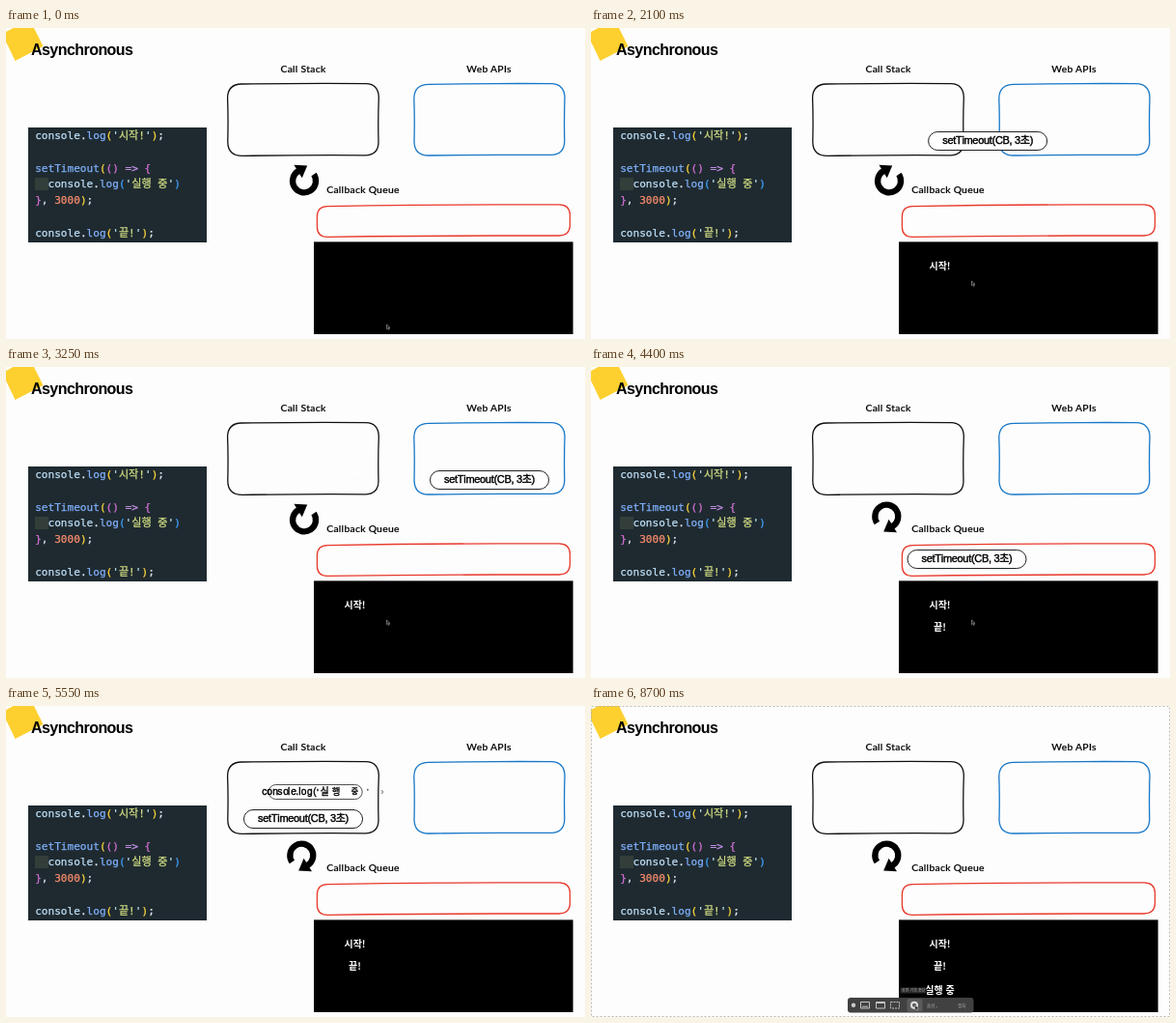
An HTML page that plays this animation: 600x322 px, repeating every 8.75 s.

```html
<!DOCTYPE html>
<html lang="ko">
<head>
<meta charset="utf-8">
<style>
html, body { margin: 0; width: 100%; height: 100%; overflow: hidden; background: #fdfdfd; }
#stage { position: relative; width: 600px; height: 322px; overflow: hidden; }
svg { position: absolute; inset: 0; }
text { font-family: 'Liberation Sans', 'Noto Sans CJK KR', 'Noto Sans CJK', sans-serif; }
.label { font: 500 10.3px Lato, sans-serif; letter-spacing: .3px; text-anchor: middle; stroke: #000; stroke-width: .2px; }
.out { font: 700 10px 'Noto Sans CJK KR', 'Noto Sans CJK', sans-serif; fill: #fff; text-anchor: middle; }
.tiny { font-size: 4.5px; fill: #aaa; }
#code {
  position: absolute; left: 23.2px; top: 102.6px; width: 177.6px; height: 118px; margin: 0;
  padding: 1.4px 0 0 7px; background: #1f2a30; color: #dfe8f2; -webkit-text-stroke: .25px;
  font: 11.08px/16.8px 'DejaVu Sans Mono', 'Noto Sans CJK KR', 'Noto Sans CJK', monospace;
}
#code i { font-style: normal; }
.o { color: #bfe0f8; } .f { color: #7fb0fb; } .y { color: #ffd83d; } .m { color: #d670d6; }
.b { color: #3fa2ff; } .k { color: #c792ea; } .n { color: #f78c6c; } .q { color: #b5e2f2; } .s { color: #d2de84; }
.tab { background: #333e3a; }
.pill {
  position: absolute; left: -62px; top: -10px; width: 124px; height: 20px; text-align: center; white-space: pre;
  font: 11px/19.4px 'Liberation Sans', 'Noto Sans CJK KR', 'Noto Sans CJK', sans-serif; letter-spacing: -.32px;
  color: #000; -webkit-text-stroke: .42px #000;
}
.pill b { position: absolute; inset: 0; box-sizing: border-box; border: 1px solid #222; border-radius: 10px; background: #fff; }
.pill span { position: relative; display: inline-block; height: 20px; vertical-align: top; }
</style>
</head>
<body>
<div id="stage">
  <svg width="600" height="322" viewBox="0 0 600 322">
    <path d="M38.5 19L9.5 34L-4 6L24.5 -9Z" fill="#fdd02f"/>
    <text x="26" y="27.5" font-size="16" font-weight="700" letter-spacing="-.55">Asynchronous</text>
    <text class="label" x="308" y="45.5">Call Stack</text>
    <text class="label" x="500.500" y="45.5">Web APIs</text>
    <text class="label" x="370" y="171">Callback Queue</text>
    <g fill="none" stroke-width="1.3" stroke-linejoin="round">
      <path stroke="#111" d="M244 58Q310 57.2 373 57.6Q386 58 386.3 72Q385.4 96 386 118Q386 131.5 372 131.8Q310 131.4 245 132.4Q230 132.5 229.8 118Q230.4 92 229.6 73Q229.4 58.4 244 58Z"/>
      <path stroke="#1677c8" d="M438 58.4Q500 57.2 565 57.6Q578.6 58 579 72Q578.2 96 578.8 117Q578.6 131 565 131.4Q500 131 438 132Q423.4 132 423 118Q423.6 92 422.8 73Q423 58.6 438 58.4Z"/>
      <path stroke="#e8392b" d="M333 184.6Q450 182.6 573 182.8Q584 183 584.4 193V205Q584 214.6 573 215Q450 214.8 333 216.4Q322.6 216.4 322.4 206V195Q322.6 184.8 333 184.6Z"/>
    </g>
    <rect x="319" y="221.4" width="268.600" height="95.6"/>
    <g id="loop">
      <path d="M319 151.6A12 12 0 1 1 303 148" fill="none" stroke="#000" stroke-width="6.300"/>
      <path d="M298.4 141.8L312.2 142.4L306.8 155.2Z"/>
    </g>
    <text class="out" x="361.5" y="249.5">시작!</text>
    <text class="out" x="361.5" y="273">끝!</text>
    <text class="out" x="361.5" y="298">실행 중</text>
    <g id="bar">
      <rect x=".5" y=".5" width="599" height="321" fill="none" stroke="#aaa" stroke-width=".8" stroke-dasharray="2 2"/>
      <rect x="266" y="302" width="130.500" height="15.500" rx="3" fill="#414141"/>
      <circle cx="272" cy="309.700" r="2.200" fill="#ccc"/>
      <g fill="none" stroke="#c4c4c4">
        <path d="M279.500 306.500h9v6.500h-9zM281 311.200h6M295.500 306.500h9v6.500h-9zM295.500 307.500h9"/>
        <path d="M310.500 306.500h9v6.500h-9z" stroke-dasharray="2 1"/>
      </g>
      <rect x="327.500" y="303" width="16" height="13.500" rx="2" fill="#5a5a5a"/>
      <circle cx="335" cy="309.700" r="3" fill="none" stroke="#ddd" stroke-width="2"/>
      <text class="tiny" x="348" y="311.500">옵션⌄</text>
      <text class="tiny" x="380" y="311.500">캡처</text>
    </g>
    <g id="tip">
      <rect x="320.500" y="291.500" width="27" height="6" rx="1" fill="#2b2b2b"/>
      <text class="tiny" x="322" y="296.200" style="font-size:4px">화면 기록 중단</text>
    </g>
  </svg>
  <pre id="code"><i class="o">console</i>.<i class="f">log</i><i class="y">(</i><i class="q">'</i><i class="s">시작!</i><i class="q">'</i><i class="y">)</i>;

<i class="f">setTimeout</i><i class="y">(</i><i class="m">()</i> <i class="k">=&gt;</i> <i class="m">{</i>
<i class="tab">  </i><i class="o">console</i>.<i class="f">log</i><i class="b">(</i><i class="q">'</i><i class="s">실행 중</i><i class="q">'</i><i class="b">)</i>
<i class="m">}</i>, <i class="n">3000</i><i class="y">)</i>;

<i class="o">console</i>.<i class="f">log</i><i class="y">(</i><i class="q">'</i><i class="s">끝!</i><i class="q">'</i><i class="y">)</i>;</pre>
  <svg id="top" width="600" height="322" viewBox="0 0 600 322">
    <path id="cursor" d="M0 0V4.600L1.200 3.700L2 5.400L2.800 5L2 3.300H3.500Z" fill="#111" stroke="#aaa" stroke-width=".6"/>
  </svg>
</div>
<script>
const LOOP = 8750, ENTER = 350, EXIT = 290, FLY = 60;
const stage = document.getElementById('stage'), topLayer = document.getElementById('top');
const $ = id => document.getElementById(id);
const ramp = (t, start, dur) => Math.min(1, Math.max(0, (t - start) / dur));
const smooth = p => p * p * (3 - 2 * p);
const easeOut = p => 1 - (1 - p) ** 3;
const mix = (a, b, p) => a + (b - a) * p;

// Each pill: label, enter time, exit time, start point, then moves [time, x, y].
const pills = [
  ["console.log('시작!')", 350, 970, [308, 117], []],
  ["setTimeout(CB, 3초)", 1400, 6350, [308, 117], [[1850, 501, 117], [3600, 389.5, 199], [4700, 308, 117]]],
  ["console.log('끝!')", 2400, 2965, [308, 117], []],
  ["console.log('실행 중')", 5343, 5850, [308, 89], []]
].map(([label, enter, exit, from, moves]) => {
  const el = document.createElement('div');
  el.className = 'pill';
  const box = el.appendChild(document.createElement('b'));
  const chars = [...label].map(c => {
    const span = el.appendChild(document.createElement('span'));
    span.textContent = c;
    return span;
  });
  stage.insertBefore(el, topLayer);
  return { el, box, chars, enter, exit, from, moves };
});

function fly(el, t, pill, lag) {
  const grow = easeOut(ramp(t, pill.enter + lag * ENTER, ENTER));
  const shrink = 1 - ramp(t, pill.exit, EXIT) ** 2;
  const s = grow * shrink;
  el.style.transform = `translateX(${FLY * (1 - s)}px) scale(${s})`;
}

function drawPill(pill, t) {
  const on = t >= pill.enter && t < pill.exit + EXIT;
  pill.el.style.display = on ? 'block' : 'none';
  if (!on) return;
  let [x, y] = pill.from;
  for (const [start, tx, ty] of pill.moves) {
    const p = smooth(ramp(t, start, 480));
    x = mix(x, tx, p);
    y = mix(y, ty, p);
  }
  pill.el.style.transform = `translate(${x}px, ${y}px)`;
  fly(pill.box, t, pill, .19);
  const last = pill.chars.length - 1;
  pill.chars.forEach((c, i) => fly(c, t, pill, .44 * (i / last) ** 5));
}

const lines = document.querySelectorAll('.out'), printed = [1320, 3350, 6220];

function drawCursor(t) {
  const late = t >= 8300, p = smooth(ramp(t, 8300, 250));
  const x = late ? mix(380, 336, p) : 394.5;
  const y = late ? mix(290, 310, p) : mix(307, 262, smooth(ramp(t, 0, 150)));
  $('cursor').setAttribute('transform', `translate(${x} ${y})`);
  $('cursor').style.opacity = late ? 1 : 1 - ramp(t, 4850, 150);
}

function frame(now) {
  const t = now % LOOP;
  pills.forEach(p => drawPill(p, t));
  lines.forEach((line, i) => line.style.opacity = ramp(t, printed[i], 120));
  $('loop').setAttribute('transform', `rotate(${180 * smooth(ramp(t, 4000, 380))} 307.7 156.5)`);
  $('bar').style.opacity = ramp(t, 8280, 60);
  $('tip').style.opacity = t >= 8600 ? 1 : 0;
  drawCursor(t);
  requestAnimationFrame(frame);
}
frame(0);
</script>
</body>
</html>
```
